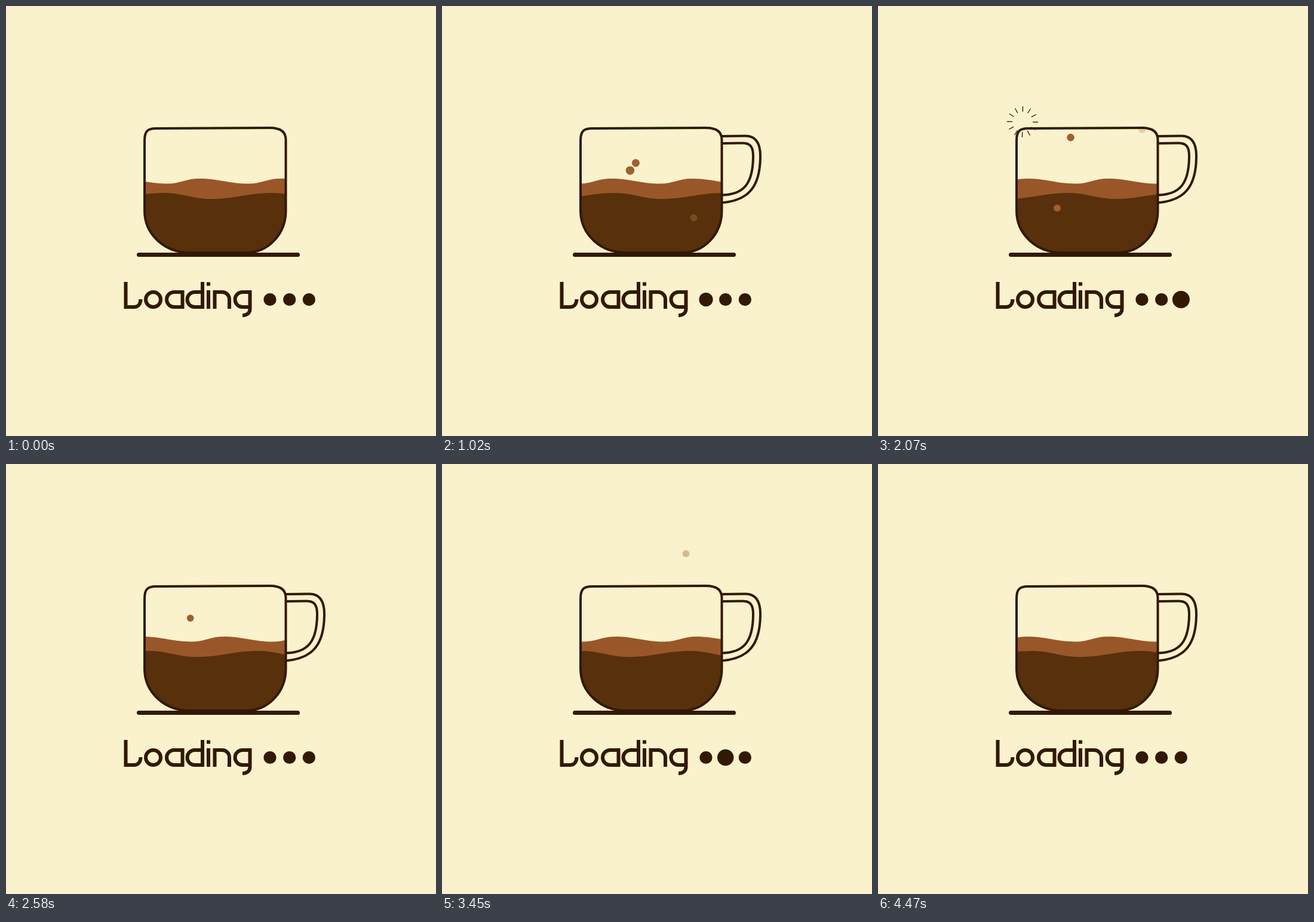
Write an HTML page that moves like this. It is 720 by 720 pixels and loops after 4.5 s.

```html
<!DOCTYPE html>
<html lang="en">
<head>
<meta charset="utf-8">
<title>Loading</title>
<style>
  html, body { margin: 0; width: 100%; height: 100%; overflow: hidden; background: #faf2cc; }
  svg { display: block; width: 100%; height: 100%; }
  .line { fill: none; stroke: #321904; stroke-width: 4; }
</style>
</head>
<body>
<svg viewBox="0 0 720 720" role="img" aria-label="Loading">
  <defs>
    <path id="cup" d="M232 225C232 210 237 205 251 205L442 204C460 204 468.5 211 468.5 224V343C468.5 381 440 413 402 413H308C264 413 232 381 232 343Z"/>
    <clipPath id="inside"><use href="#cup"/></clipPath>
  </defs>
  <g clip-path="url(#inside)">
    <path id="foam" fill="#995729"/>
    <path id="coffee" fill="#58300b"/>
  </g>
  <g id="bubbles" fill="#a0602f"></g>
  <g id="handle" class="line">
    <path pathLength="1" d="M468 218L508 217.500C526 217.500 533 231 533 251C533 302 514 326 468 329.500"/>
    <path pathLength="1" d="M468 230L503 229.500C517 229.500 521 237 521 251C521 298 505 316 468 316.500"/>
  </g>
  <use href="#cup" class="line"/>
  <path class="line" d="M222.500 416.600H488.500" style="stroke-width:7;stroke-linecap:round"/>
  <g class="line" style="stroke-width:6">
    <path d="M200.500 462V504H214C221 504 225.500 499 225.500 491"/>
    <circle cx="246.500" cy="491.500" r="12.500"/>
    <path d="M295.500 507V479H281.500A12.500 12.500 0 0 0 281.500 504H295.500"/>
    <path d="M329 462V507M329 479H316A12.500 12.500 0 0 0 316 504H329"/>
    <path d="M339 476V507M339 462.500V468.500"/>
    <path d="M349.500 507V479H362A12 12 0 0 1 374 491V507"/>
    <path d="M408.500 504H396A12.500 12.500 0 0 1 396 479H408.500V507C408.500 514 404 518 396 518"/>
  </g>
  <g id="dots" fill="#321904"></g>
  <path id="rays" class="line" style="stroke-width:1.3"/>
</svg>
<script>
const LOOP = 4500;
const $ = id => document.getElementById(id);
const clamp = v => Math.max(0, Math.min(1, v));
const smooth = v => v * v * (3 - 2 * v);

function set(el, attrs) {
  for (const k in attrs) el.setAttribute(k, attrs[k]);
}
function addCircle(parent, cx, cy, r) {
  const c = document.createElementNS('http://www.w3.org/2000/svg', 'circle');
  set(c, { cx, cy, r });
  return parent.appendChild(c);
}

const bubbles = [
  { start: 368, life: 1403, x: 326.5, drift: -115, height: 164, r: 7.2 },
  { start: 587, life: 800, x: 330, drift: -35, height: 164, r: 6.5 },
  { start: 970, life: 1170, x: 421.5, drift: 25, height: 164, r: 6 },
  { start: 1044, life: 900, x: 398, drift: 35, height: 164, r: 6.5 },
  { start: 1550, life: 800, x: 354, drift: -114, height: 200, r: 6.3 },
  { start: 1923, life: 1691, x: 300, drift: 147, height: 230, r: 5.9 }
];
const bursts = [
  { start: 1885, x: 242, y: 194 },
  { start: 2800, x: 438, y: 43 },
  { start: 3660, x: 240, y: 84.6 }
];
const bubbleEls = bubbles.map(b => addCircle($('bubbles'), 0, 0, b.r));
const dotEls = [0, 1, 2].map(i => addCircle($('dots'), 442 + i * 32.7, 491.5, 10.6));

// Slows as it climbs, drifts sideways late, fades at both ends
function bubbleAt(t, b) {
  const p = clamp((t - b.start) / b.life);
  return {
    cx: b.x + b.drift * p ** 3,
    cy: 364 - b.height * p * (1.3 - .3 * p),
    opacity: clamp(Math.min(p * 12, (1 - p) * 4))
  };
}

// Repeating swell: falls over `fall` pixels, climbs over the rest
function wave(crest, length, fall, high, low) {
  const begin = crest % length;
  let x = begin, d = `M${x} ${high}`;
  const swing = (w, from, to) => {
    d += `C${x + w * .4} ${from} ${x + w * .6} ${to} ${x + w} ${to}`;
    x += w;
  };
  while (x < 480) {
    swing(fall, high, low);
    swing(length - fall, low, high);
  }
  return d + `V420H${begin}Z`;
}

function burst(t, { start, x, y }) {
  const p = (t - start) / 340;
  if (p <= 0 || p >= 1) return '';
  const outer = 12 + 14 * clamp(p / .4);
  const inner = 12 + 14 * clamp((p - .3) / .7);
  let d = '';
  for (let i = 0; i < 12; i++) {
    const angle = i * Math.PI / 6 + .02;
    const c = Math.cos(angle), s = Math.sin(angle);
    d += `M${x + c * inner} ${y + s * inner}L${x + c * outer} ${y + s * outer}`;
  }
  return d;
}

function draw(t) {
  set($('foam'), { d: wave(51 + t / 600 * 136, 136, 83, 289, 297.5) });
  set($('coffee'), { d: wave(82 + t / 900 * 182, 182, 79, 313, 323) });

  const grown = smooth(clamp(t / 510));
  set($('handle'), { 'stroke-dasharray': `${grown} 2`, visibility: grown ? 'visible' : 'hidden' });

  bubbles.forEach((b, i) => set(bubbleEls[i], bubbleAt(t, b)));
  dotEls.forEach((el, i) => {
    const since = t - 870 - i * 600;
    const away = Math.min(Math.abs(since), Math.abs(since - 2045));
    set(el, { r: 10.6 + 3.9 * smooth(clamp(1 - away / 225)) });
  });
  set($('rays'), { d: bursts.map(b => burst(t, b)).join('') });
}

const began = performance.now();
function tick() {
  draw((performance.now() - began) % LOOP);
  requestAnimationFrame(tick);
}
draw(0);
requestAnimationFrame(tick);
</script>
</body>
</html>
```
